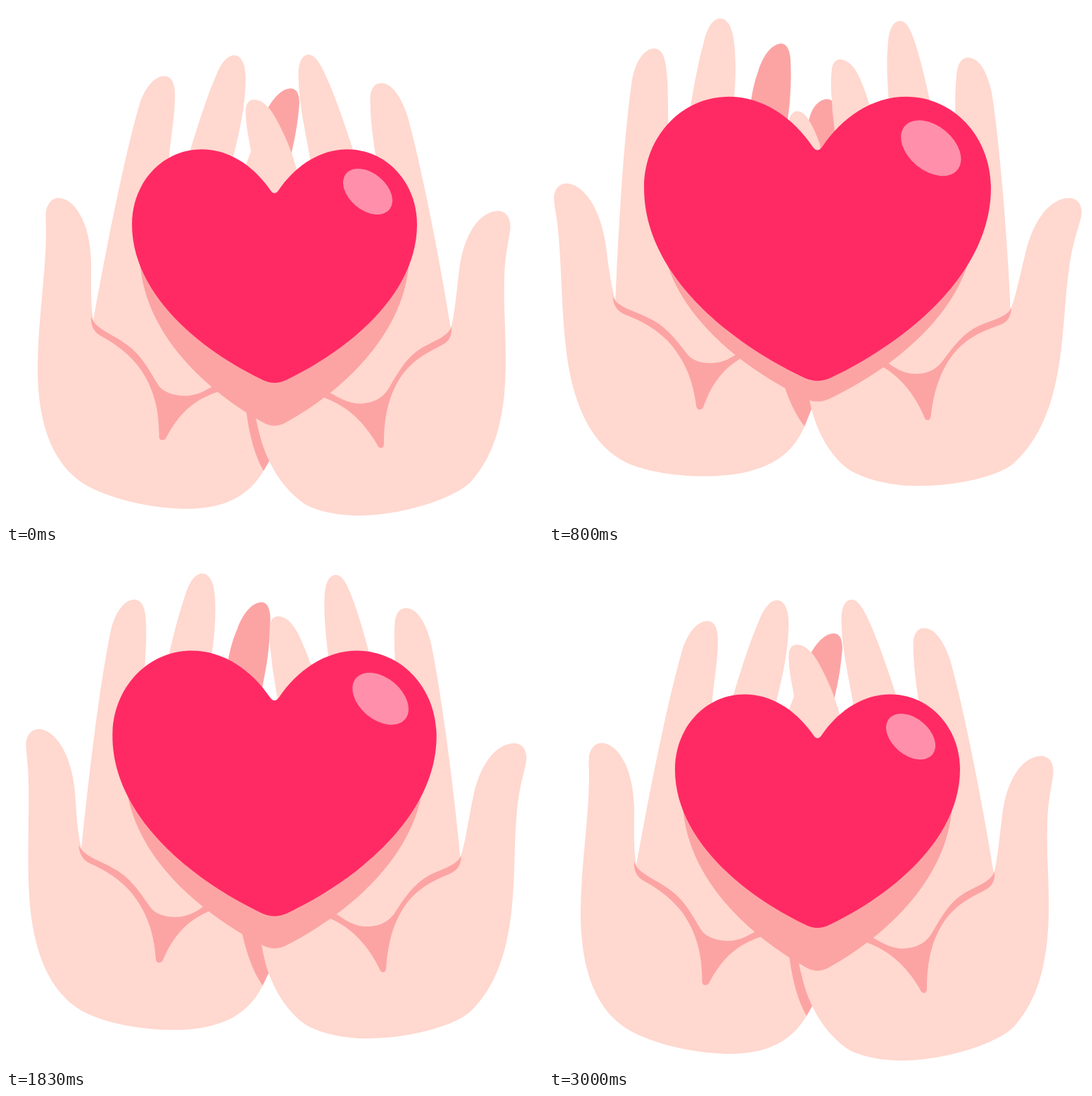
Animation, 763 px wide and 734 px high, one loop 3030 ms. Source, as an HTML page:

```html
<!DOCTYPE html>
<html lang="en">
<head>
<meta charset="utf-8">
<title>Heart in hands</title>
<style>
  html, body { margin: 0; width: 100%; height: 100%; overflow: hidden; background: #fff; }
  svg { display: block; width: 100%; height: 100%; }
  .skin { fill: #ffd8cf; }
  .shade { fill: #fca4a4; }
  .heart { fill: #ff2a64; }
  .gloss { fill: #ff8fab; }
</style>
</head>
<body>
<svg viewBox="0 0 763 734">
  <defs>
    <path id="heartShape" d="M179 310C179 250 223 203.5 278 203.5C318 203.5 353 228 376 262Q381.5 269.5 387 262
      C410 228 445 203.5 485 203.5C540 203.5 584 250 584 310C584 408 489 487 400 530Q381.5 540 363 530
      C274 487 179 408 179 310Z"/>
  </defs>

  <g id="leftHand" class="skin">
    <!-- little and ring fingers lie in shade -->
    <path class="shade" d="M402 295L433 225C440 210 450 204 459 204C468 204 473 212 472 230L466 300Z"/>
    <path class="shade" d="M326 270L342.6 222L351 200C356 180 362 165 368 153.5C377 133 391 117 405 117
      C414 117 418 128 416.5 143C414 170 410 190 406 207L388 275Z"/>
    <path d="M326 268L342.6 222L351 200Q356 212 359 222V268Z"/>
    <!-- middle, index, palm with thumb -->
    <path d="M240 270L262 204C273 168 285 130 298 100C305 82 314 70 324 70C335 70 341 84 340.5 105
      C340 145 330 185 323 214L326 270Z"/>
    <path d="M124 446C142 345 168 215 189 142C196 118 210 99.5 225 99.5C235 99.5 240.5 110 240 128
      C240 160 233 190 232 216L236 300L300 500Z"/>
    <path d="M124 446L236 262H392L425 500C410 560 395 610 378 639L366 660C345 695 312 714 255 714
      C195 713 135 695 107 676C62 645 45 585 45 515C45 450 56 385 57 325C57 310 56 300 57 290
      C60 278 67 272.5 75 272.5C96 273 120 305 121 365C121 395 120 425 124 446Z"/>
    <path class="shade" d="M366 660C354 640 346 610 342 580L330 500H425C410 560 395 610 378 639Z"/>
    <path class="shade" d="M121 441C126 458 150 465 169 479C192 494 204 518 215.5 537C223 549 240 554 257 553.5
      C275 552 282 546 292 541L318 528L322 536L300 548C265 560 245 580 228 612C226 618 217.5 618 217.5 611
      C218 570 208 540 190 514C172 490 150 477 134 468C124 462 120 452 121 441Z"/>
  </g>

  <g id="rightHand" class="skin">
    <!-- little, ring, middle, index, palm with thumb -->
    <path d="M300 330L287 240C287 220 293 213 300 213C304 213 309 215 314 221C322 230 328 240 336 256L350 330Z"/>
    <path d="M430 290L413 232C406 205 395 180 382 157C372 140 362 133 352 133C344 133 340.5 140 340.5 150
      C341 175 346 190 348 206L364 275Z"/>
    <path d="M512 270L493 204C482 170 470 135 458 107C448 84 440 69 430 69C420 69 415 82 415.5 100
      C416 140 426 180 432 216L424 270Z"/>
    <path d="M632 458C618 370 590 225 570 155C561 128 548 109.5 533 109.5C523 109.5 517 118 517.5 135
      C518 165 522 190 525 212L512 300L480 500Z"/>
    <path d="M632 458L512 262H364L300 320C310 420 345 500 355 585C360 610 366 630 374 646
      C390 680 418 708 440 714C460 721 482 723.5 505 723.5C565 722 635 700 660 676
      C700 632 710.5 570 710 500C710 460 707 425 708 395C708 360 713 340 716 320C719 302 711 291 699 291
      C672 292 650 325 644 375C640 405 638 435 632 458Z"/>
    <path class="shade" d="M633 455C628 470 606 476 589 486.5C569 499 557 520 545.5 540C536 558 520 564 502 564.5
      C485 564 473 556 462 550L436 536L432 546L452 556C485 568 508 590 527 622C529 629 537 630 537 621
      C537 580 545 550 562 525C580 500 603 490 620 481C630 476 634 467 633 455Z"/>
  </g>

  <use id="shadow" href="#heartShape" class="shade"/>
  <g id="heart">
    <use href="#heartShape" class="heart"/>
    <ellipse class="gloss" cx="514" cy="263.5" rx="40" ry="26.2" transform="rotate(39.6 514 263.5)"/>
  </g>
</svg>

<script>
const LOOP = 3030;
const AXIS = 381.5, MIDDLE = 369.5, TIP = 535;

// Same curve as cubic-bezier(.36, 0, .48, 1), solved by bisection.
function ease(x) {
  let low = 0, high = 1, t;
  for (let i = 0; i < 24; i++) {
    t = (low + high) / 2;
    const reached = 1.08 * t * (1 - t) ** 2 + 1.44 * t * t * (1 - t) + t ** 3;
    if (reached < x) low = t; else high = t;
  }
  return t * t * (3 - 2 * t);
}

const progress = (t, from, to) => ease(Math.min(1, Math.max(0, (t - from) / (to - from))));

// Rises from 0 to 1 at the peak, then falls back.
const pulse = (t, start, peak, end) =>
  t < peak ? progress(t, start, peak) : 1 - progress(t, peak, end);

const place = (id, transform) => document.getElementById(id).setAttribute('transform', transform);

// Scales about a point on the heart's axis, which is moved to height y.
const placeHeart = (id, y, sx, sy, anchor) =>
  place(id, `translate(${AXIS} ${y}) scale(${sx} ${sy}) translate(${-AXIS} ${-anchor})`);

function draw(t) {
  const open = pulse(t, 0, 970, LOOP);
  const lift = 48 * pulse(t, 0, 1150, LOOP);
  place('leftHand', `translate(${-7.9 * open} ${-lift - 2 * open}) rotate(${-8.1 * open} 222 616)`);
  place('rightHand', `translate(${5.1 * open} ${-lift + 2 * open}) rotate(${6.9 * open} 532 627)`);

  const scale = 1 + .288 * pulse(t, 280, 1150, 2650);
  const heartY = MIDDLE - 51.5 * pulse(t, 0, 1340, LOOP);
  placeHeart('heart', heartY, scale, scale, MIDDLE);

  // The shadow tightens as the hands open.
  const gap = 61 - 38.5 * open;
  const shadowTip = heartY + scale * (TIP - MIDDLE + gap);
  const width = scale * (.946 - .047 * open);
  placeHeart('shadow', shadowTip, width, width * (1.15 - .15 * open), TIP);
}

const start = performance.now();
function tick() {
  draw((performance.now() - start) % LOOP);
  requestAnimationFrame(tick);
}
tick();
</script>
</body>
</html>
```
